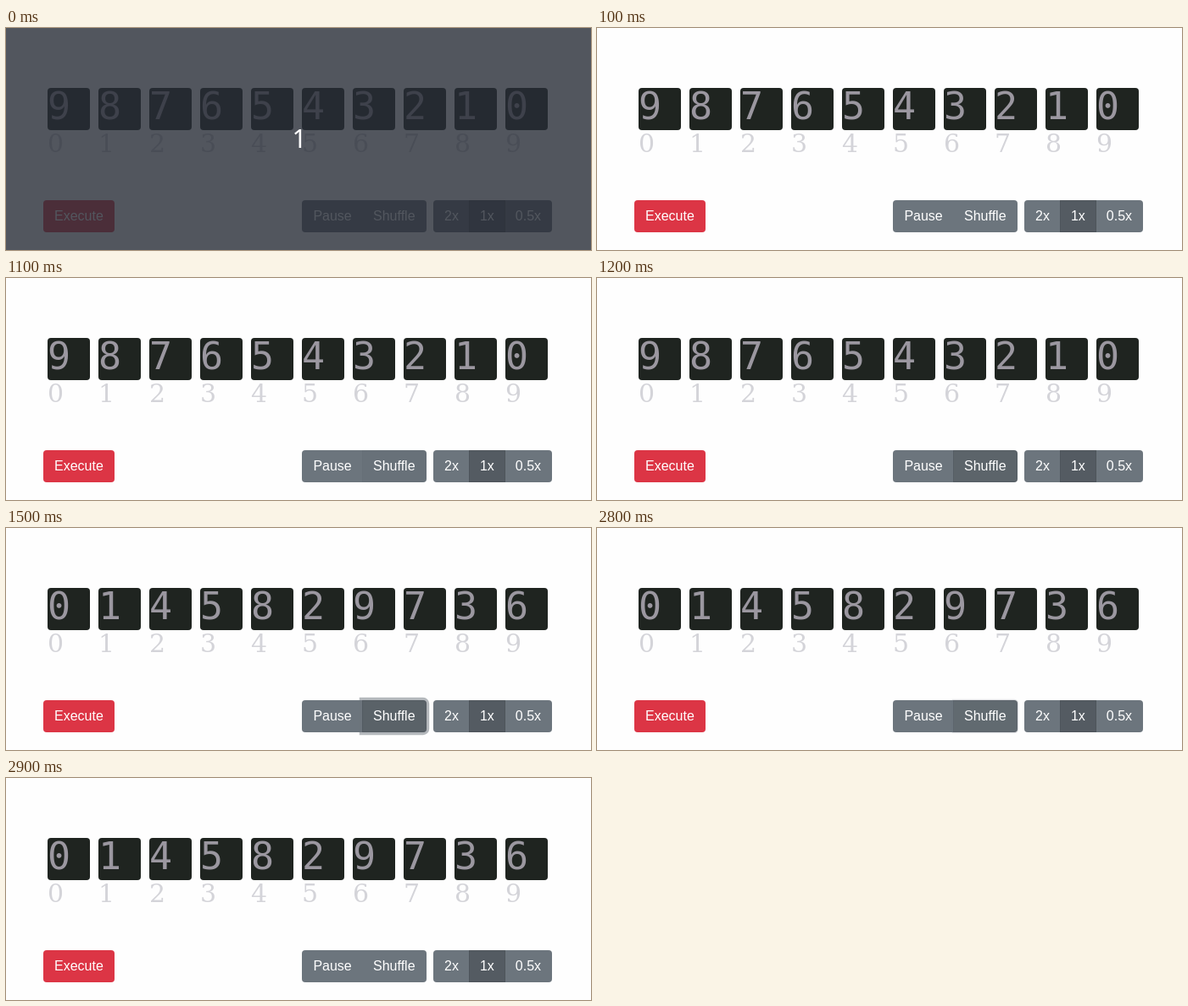
Animation, 690 px wide and 263 px high, one loop 3 s. Source, as an HTML page with a canvas:

```html
<!DOCTYPE html>
<html lang="en">
<head>
<meta charset="utf-8">
<title>Shuffle</title>
<style>
html, body { margin: 0; width: 100%; height: 100%; overflow: hidden; background: #fff; }
canvas { display: block; width: 690px; height: 263px; }
</style>
</head>
<body>
<canvas id="stage" width="690" height="263"></canvas>
<script>
const ctx = document.getElementById('stage').getContext('2d');
const LOOP = 3000;
const SANS = '16px "Liberation Sans", Arial, sans-serif';
const GREY = [108, 117, 125], HOVER = [90, 98, 104], HOVER_EDGE = [84, 91, 98];

// Each state holds until the next one: hover amount, focus ring amount
const states = [
  { at: 0, hover: 0, ring: 0 },
  { at: 1100, hover: 0.2, ring: 0 },
  { at: 1200, hover: 0.9, ring: 0 },
  { at: 1300, hover: 1, ring: 0.6 },
  { at: 1500, hover: 1, ring: 1 },
  { at: 2800, hover: 0.6, ring: 0.4 },
  { at: 2900, hover: 0, ring: 0 }
];

function mix(a, b, t) {
  return `rgb(${a.map((v, i) => Math.round(v + (b[i] - v) * t)).join(',')})`;
}

function box(x, y, w, h, radii, fill) {
  ctx.beginPath();
  ctx.roundRect(x, y, w, h, radii);
  ctx.fillStyle = fill;
  ctx.fill();
}

function text(str, x, y, font, fill, align = 'left') {
  ctx.font = font;
  ctx.fillStyle = fill;
  ctx.textAlign = align;
  ctx.fillText(str, x, y);
}

function button(label, x, right, textX, radii, fill, edge = fill) {
  box(x, 204, right - x, 38, radii, edge);
  if (edge !== fill) {
    box(x + 1, 205, right - x - 2, 36, radii.map(r => Math.max(0, r - 1)), fill);
  }
  text(label, textX, 228, SANS, '#fff');
}

function drawTiles(digits) {
  [...digits].forEach((digit, i) => {
    const x = 49 + i * 60;
    box(x, 71, 50, 50, 4, '#1f2420');
    text(digit, x, 108, '45px "DejaVu Sans Mono", monospace', '#9b97a0');
    text(String(i), x, 147, '30px "DejaVu Serif", serif', '#d4d4d9');
  });
}

function drawRing(amount) {
  const s = 3.2 * amount, r = 4 + s;
  box(420 - s, 204 - s, 76 + 2 * s, 38 + 2 * s, [0, r, r, 0],
    `rgba(108,117,125,${0.5 * amount})`);
}

function drawButtons({ hover, ring }) {
  const left = [4, 0, 0, 4], right = [0, 4, 4, 0], none = [0, 0, 0, 0];
  const grey = mix(GREY, GREY, 0);
  button('Execute', 44, 128, 57, [4, 4, 4, 4], '#dc3545');
  button('Pause', 349, 421, 362.4, left, grey);
  if (ring) drawRing(ring);
  // Opaque backing keeps the ring outside the rounded corners
  button('Shuffle', 420, 496, 433, right, mix(GREY, HOVER, hover), mix(GREY, HOVER_EDGE, hover));
  button('2x', 504, 547, 517, left, grey);
  button('0.5x', 588, 644, 600.8, right, grey);
  button('1x', 546, 589, 558.9, none, '#545b62', '#4e555b');
}

function drawCountdown() {
  ctx.fillStyle = 'rgba(39,44,54,0.8)';
  ctx.fillRect(0, 0, 690, 263);
  text('1', 346, 142, '30px "Noto Sans", "Open Sans", sans-serif', '#fff', 'center');
}

function draw(t) {
  ctx.fillStyle = '#fefefe';
  ctx.fillRect(0, 0, 690, 263);
  drawTiles(t < 1300 ? '9876543210' : '0145829736');
  drawButtons(states.findLast(s => t >= s.at));
  if (t < 100) drawCountdown();
}

const start = performance.now();
function tick() {
  draw((performance.now() - start) % LOOP);
  requestAnimationFrame(tick);
}
tick();
</script>
</body>
</html>
```
